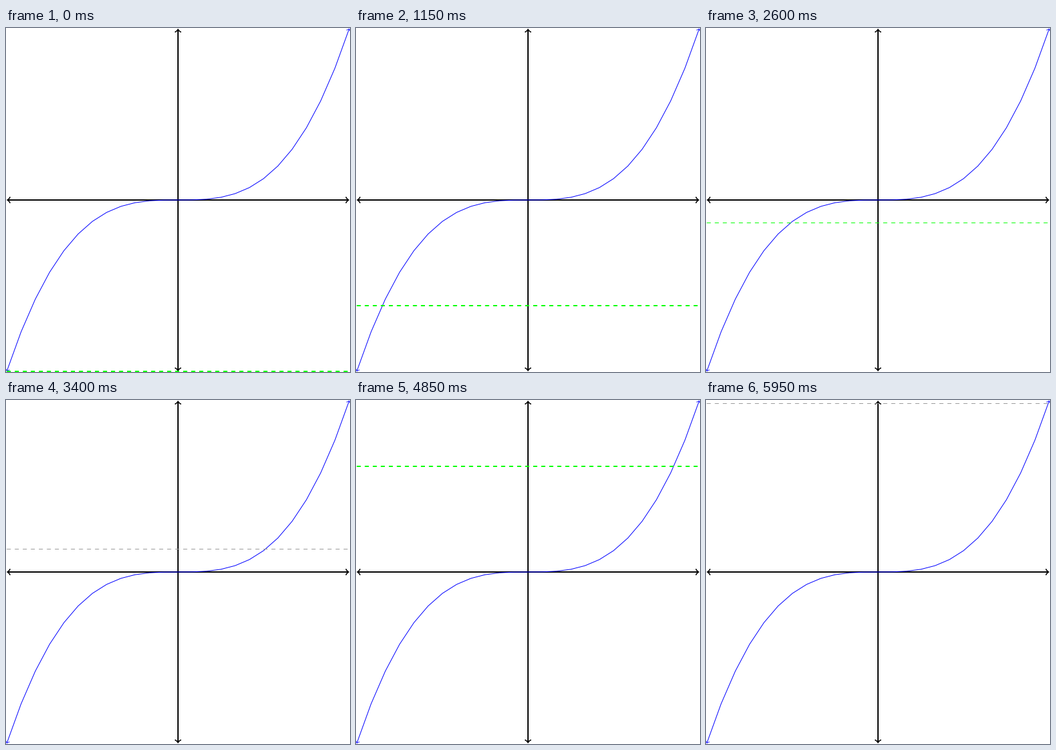
Animation of 534x534 px, one loop 6 s. Source, as a matplotlib script:

```python
import numpy as np
import matplotlib.pyplot as plt
from matplotlib.animation import FuncAnimation
from matplotlib.patches import PathPatch
from matplotlib.path import Path

SIZE, DPI = 534, 72          # at 72 dpi one point is one pixel
FRAMES, INTERVAL = 120, 50
MID, HALF = 267, 265.75
START, STEP = 532.8, 4.431   # sweep of the horizontal line
GREEN, GREY = "#00ff00", "#999999"

plt.rcParams["lines.scale_dashes"] = False
plt.rcParams["path.snap"] = False

fig = plt.figure(figsize=(SIZE / DPI, SIZE / DPI), dpi=DPI, facecolor="white")
ax = fig.add_axes([0, 0, 1, 1])
ax.set_xlim(0, SIZE)
ax.set_ylim(SIZE, 0)
ax.axis("off")


def arrow_tip(x, y, dx, dy, a, width, color):
    """Curved arrow head with its apex at (x, y), pointing along (dx, dy)."""
    d = np.array([dx, dy]) / np.hypot(dx, dy)
    n = np.array([-d[1], d[0]])
    pts = [(-3.75, 4), (-3.5, 2.5), (-0.75, 0.25), (0, 0),
           (-0.75, -0.25), (-3.5, -2.5), (-3.75, -4)]
    verts = [np.array([x, y]) + a * (u * d + v * n) for u, v in pts]
    path = Path(verts, [Path.MOVETO] + [Path.CURVE4] * 6)
    ax.add_patch(PathPatch(path, fill=False, lw=width, ec=color,
                           capstyle="round", joinstyle="round", zorder=2))


def arrow_line(xs, ys, a, width, tip_width, color):
    """Polyline with an arrow head at both ends."""
    ax.plot(xs, ys, color=color, lw=width, solid_capstyle="butt",
            solid_joinstyle="round", zorder=2)
    for end, prev in ((0, 1), (-1, -2)):
        arrow_tip(xs[end], ys[end], xs[end] - xs[prev], ys[end] - ys[prev],
                  a, tip_width, color)


lo, hi = 2, 532
arrow_line([lo, hi], [MID, MID], 1.1, 2, 1.6, "black")
arrow_line([MID, MID], [hi, lo], 1.1, 2, 1.6, "black")

u = np.linspace(-1, 1, 25)
arrow_line(MID + HALF * u, MID - HALF * u**3, 0.83, 1, 0.8, "blue")

sweep, = ax.plot([1.2, 532.7], [START, START], dashes=(6.23, 6.22),
                 dash_capstyle="butt", zorder=3)


def update(i):
    # the line sits on half pixels: two rows on whole values, one row between
    y = round(2 * (START - STEP * i)) / 2
    single = y % 1 != 0
    sweep.set_ydata([y, y])
    sweep.set_linewidth(1 if single else 2)
    sweep.set_color(GREY if single and y < MID else GREEN)
    return sweep,


anim = FuncAnimation(fig, update, frames=FRAMES, interval=INTERVAL,
                     repeat=True, repeat_delay=0, blit=False)
plt.show()
```
